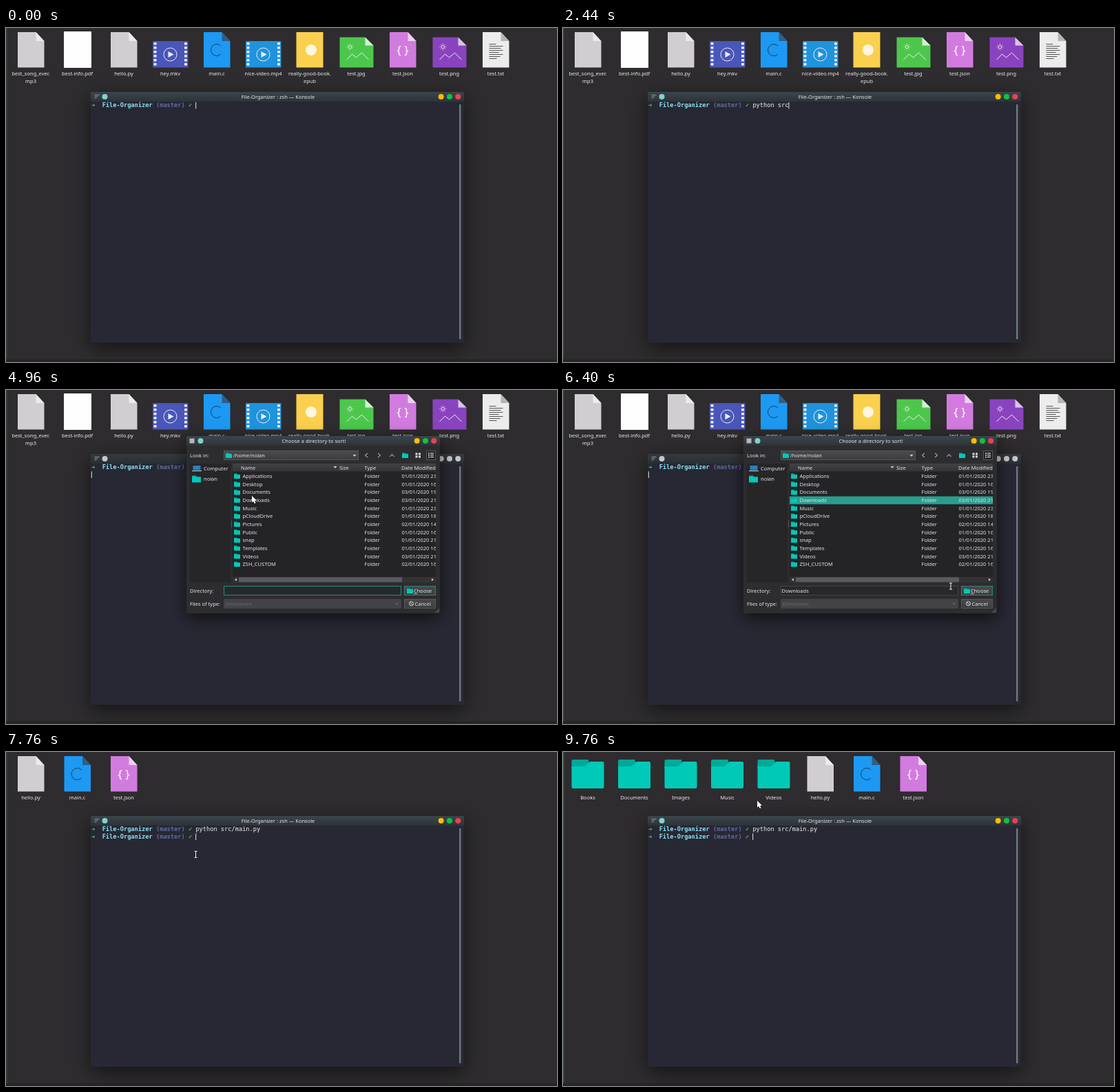
These frames come from a looping animation (800x486 px, 10 s). An HTML page with a canvas:

```html
<!DOCTYPE html>
<html lang="en">
<head>
<meta charset="utf-8">
<title>File organizer</title>
<style>
html, body { margin: 0; width: 100%; height: 100%; overflow: hidden; background: #2e2c2e; }
canvas { display: block; }
</style>
</head>
<body>
<canvas id="stage" width="800" height="486"></canvas>
<script>
const c = document.getElementById('stage').getContext('2d');
const LOOP = 10000, TEAL = '#00c9b7', CELL = 5.22;
const UI = '7.5px "Noto Sans", sans-serif';
const MONO = '8.67px "DejaVu Sans Mono", monospace';

// ---- helpers ----
function rect(x, y, w, h, fill, r = 0) {
  c.fillStyle = fill;
  c.beginPath();
  c.roundRect(x, y, w, h, r);
  c.fill();
}
function frame(x, y, w, h, color) {
  c.strokeStyle = color;
  c.lineWidth = 1;
  c.strokeRect(x + .5, y + .5, w - 1, h - 1);
}
function poly(points, fill) {
  c.fillStyle = fill;
  c.beginPath();
  for (let i = 0; i < points.length; i += 2) c.lineTo(points[i], points[i + 1]);
  c.closePath();
  c.fill();
}
function line(points, color, width = 1) {
  c.strokeStyle = color;
  c.lineWidth = width;
  c.beginPath();
  for (let i = 0; i < points.length; i += 2) c.lineTo(points[i], points[i + 1]);
  c.stroke();
}
function dot(x, y, r, fill) {
  c.fillStyle = fill;
  c.beginPath();
  c.arc(x, y, r, 0, 7);
  c.fill();
}
function ring(x, y, r, color, from = 0, to = 7) {
  c.strokeStyle = color;
  c.lineWidth = 1;
  c.beginPath();
  c.arc(x, y, r, from, to);
  c.stroke();
}
function text(s, x, y, color = '#e6e6e6', align = 'left', font = UI) {
  c.font = font;
  c.textAlign = align;
  c.fillStyle = color;
  c.fillText(s, x, y);
}
function shade(y, h, top, bottom) {
  const g = c.createLinearGradient(0, y, 0, y + h);
  g.addColorStop(0, top);
  g.addColorStop(1, bottom);
  return g;
}
function shadowed(blur, drop, alpha, paint) {
  c.save();
  c.shadowColor = `rgba(0,0,0,${alpha})`;
  c.shadowBlur = blur;
  c.shadowOffsetY = drop;
  paint();
  c.restore();
}
const clamp = v => Math.max(0, Math.min(1, v));
const ease = v => v * v * (3 - 2 * v);

// ---- desktop icons, drawn around x = 0 ----
function doc(fill, fold) {
  poly([-19, 6, 7.5, 6, 19.5, 19, 19.5, 57.5, -19, 57.5], fill);
  poly([7.5, 6, 19.5, 19, 7.5, 19], fold);
}
function film(fill) {
  rect(-25.5, 19, 51.5, 38.5, fill, 1);
  for (let y = 21; y < 56; y += 6)
    for (const x of [-24, 20.5]) rect(x, y, 4, 3.5, '#e8eefa', .5);
  ring(0, 38.5, 9.5, '#eef');
  poly([-3, 34, 5, 38.5, -3, 43], '#eef');
}
function picture(fill, fold) {
  poly([-24, 13.5, 13, 13.5, 25, 25.5, 25, 57.5, -24, 57.5], fill);
  poly([13, 13.5, 25, 25.5, 13, 25.5], fold);
  line([-14, 46, -6, 38, 0, 43, 8, 36, 18, 46], '#f0f0f0');
  ring(-9, 27.5, 2.2, '#f0f0f0');
  for (let a = 0; a < 8; a++) {
    const x = Math.cos(a * Math.PI / 4), y = Math.sin(a * Math.PI / 4);
    line([-9 + 3.3 * x, 27.5 + 3.3 * y, -9 + 4.8 * x, 27.5 + 4.8 * y], '#f0f0f0', .8);
  }
}
function folder() {
  rect(-23.5, 11, 25, 14, '#00a999', 2);
  c.fillStyle = TEAL;
  c.beginPath();
  c.moveTo(-23.5, 21);
  c.lineTo(-4, 21);
  c.lineTo(3, 14);
  c.lineTo(21.5, 14);
  c.quadraticCurveTo(23.5, 14, 23.5, 16);
  c.lineTo(23.5, 51);
  c.quadraticCurveTo(23.5, 53, 21.5, 53);
  c.lineTo(-21.5, 53);
  c.quadraticCurveTo(-23.5, 53, -23.5, 51);
  c.fill();
}
const plain = () => doc('#d0ced0', '#ebebeb');
const icons = {
  mp3: plain,
  py: plain,
  pdf: () => rect(-19.5, 5, 40, 53, '#fefefe'),
  mkv: () => film('#4a56b8'),
  mp4: () => film('#1f93dc'),
  c() {
    doc('#1d99f3', '#2f5f85');
    ring(0, 32, 8.5, '#173f63', .8, 5.5);
  },
  epub() {
    rect(-19.5, 6, 39, 51.5, '#fbd04f');
    dot(2, 32, 8, '#fdf6e0');
  },
  jpg: () => picture('#4cc74c', '#d5efd5'),
  png: () => picture('#8a43bf', '#d9c3e8'),
  json() {
    doc('#d27bdf', '#ecd0f0');
    text('{ }', 0, 38, '#fff', 'center', '300 17px "Noto Sans", sans-serif');
  },
  txt() {
    doc('#ececec', '#b5b5b5');
    [10, 20, 17, 20, 14, 20, 16, 11].forEach((w, i) => rect(-9.5, 23 + i * 3, w, 1, '#555'));
  }
};
const allFiles = ['best_song_ever.|mp3', 'best-info.pdf', 'hello.py', 'hey.mkv', 'main.c', 'nice-video.mp4',
  'really-good-book.|epub', 'test.jpg', 'test.json', 'test.png', 'test.txt'];
const codeFiles = ['hello.py', 'main.c', 'test.json'];
const sorted = ['Books', 'Documents', 'Images', 'Music', 'Videos', ...codeFiles];

function desktop(t) {
  rect(0, 0, 800, 486, '#2e2c2e');
  rect(0, 0, 1.5, 486, t > 9100 ? '#2c5a50' : '#3a4142');
  rect(0, 482, 800, 4, '#272527');
  const items = t < 7760 ? allFiles : t < 7800 ? codeFiles : sorted;
  items.forEach((name, i) => {
    c.save();
    c.translate(36 + 67.5 * i, 0);
    (icons[name.split(/[.|]+/).pop()] || folder)();
    name.split('|').forEach((s, row) => text(s, 0, 69.3 + row * 10.3, '#ececec', 'center'));
    c.restore();
  });
}

// ---- windows ----
function titleBar(x, y, w, title, active) {
  rect(x, y, w, 14, shade(y, 14, active ? '#3b454b' : '#343a40', active ? '#2d343a' : '#2b2f35'), [2, 2, 0, 0]);
  text(title, x + w / 2 + 1, y + 9.7, active ? '#e6e8e8' : '#a5a8aa', 'center');
  const colors = active ? ['#ffbd00', '#13c23f', '#e8434e'] : ['#c6c7c9', '#c6c7c9', '#c6c7c9'];
  colors.forEach((fill, i) => dot(x + w - 33.3 + i * 12.3, y + 7, 4, fill));
  dot(x + 20.5, y + 7, 4, active ? '#7fd3c9' : '#c6c7c9');
}

const command = 'python src/main.py';
const keyTimes = [880, 960, 1120, 1200, 1280, 1360, 1440, 1720, 1880, 2440, 2680,
  2920, 3040, 3160, 3280, 3400, 3520, 3640];

function term(s, col, row, color, weight = 'bold ') {
  text(s, 124 + col * CELL, 115.4 + row * 10.5, color, 'left', weight + MONO);
}
function prompt(row) {
  term('➜', 0, row, '#3fe06a');
  term('File-Organizer', 3, row, '#8be3f7');
  term('(master)', 18, row, '#5f6da3');
  term('✓', 27, row, '#50fa7b');
}
function terminal(t) {
  const active = t < 4480 || t >= 6720;
  shadowed(28, 8, .55, () => rect(123, 93, 542, 365, '#282a36', 2));
  titleBar(123, 93, 542, 'File-Organizer : zsh — Konsole', active);
  for (let i = 0; i < 3; i++) rect(128.5, 97 + i * 2.2, 7 - i * 2, 1, '#8c9398');
  rect(123, 107, 542, 351, '#272833');
  rect(658, 111, 2.5, 342, '#6d777e', 1);

  const typed = keyTimes.filter(k => k <= t).length;
  prompt(0);
  term(command.slice(0, typed), 29, 0, '#f2f2ee', '');
  let col = 29 + typed, row = 0;
  if (t >= 4000) [col, row] = [0, 1];
  if (t >= 7760) {
    prompt(1);
    col = 29;
  }
  rect(124 + col * CELL - .2, 108 + row * 10.5, 1, 9.5, '#e8e8e8');
}

// ---- directory chooser ----
const folders = [['Applications', '01', 23], ['Desktop', '01', 16], ['Documents', '03', 19], ['Downloads', '03', 21],
  ['Music', '01', 23], ['pCloudDrive', '01', 18], ['Pictures', '02', 14], ['Public', '01', 16], ['snap', '01', 21],
  ['Templates', '01', 16], ['Videos', '03', 21], ['ZSH_CUSTOM', '02', 16]];

function smallFolder(x, y, w = 9, h = 7.5) {
  rect(x, y, w * .5, h * .5, '#00a999', .5);
  rect(x, y + h * .17, w, h * .83, TEAL, .5);
}
function button(x, y, w, h, border = '#55575a') {
  rect(x, y, w, h, shade(y, h, '#4a4b4e', '#3b3c3f'), 1.5);
  frame(x, y, w, h, border);
}
function chooser(t) {
  const picked = t >= 5640;
  shadowed(24, 7, .6, () => rect(262, 67, 368, 258, '#2d2c2f', 2));
  titleBar(262, 67, 368, 'Choose a directory to sort!', true);
  rect(266.5, 70.5, 7, 7, '#b4b7b9');

  text('Look in:', 267, 98);
  button(316, 88, 196, 14);
  smallFolder(319, 91.5);
  text('/home/nolan', 330, 98);
  poly([503.5, 94, 508.5, 94, 506, 97], '#ccc');
  line([525, 92, 521.5, 95, 525, 98], '#ddd');
  line([540, 92, 543.5, 95, 540, 98], '#ddd');
  line([557.5, 97, 560.5, 93.5, 563.5, 97], '#ddd');
  smallFolder(575, 91.5);
  for (let i = 0; i < 4; i++) {
    const x = 594.5 + i % 2 * 4.5, y = 91.5 + (i >> 1) * 4;
    rect(x, y, 3, 3, '#ddd');
  }
  rect(610, 88, 14, 14, '#232326', 1);
  frame(610, 88, 14, 14, '#58595c');
  for (let i = 0; i < 3; i++) {
    rect(613, 91.5 + i * 2.7, 2, 1.5, '#ddd');
    rect(616, 91.5 + i * 2.7, 5, 1.2, '#ddd');
  }

  rect(267, 107, 59, 173, '#262629');
  rect(271.5, 110, 11, 6.5, '#2a7fc0', .5);
  rect(270, 117, 14, 1.3, '#a9b2b8');
  text('Computer', 287, 117);
  smallFolder(270, 124.5, 13, 10);
  text('nolan', 287, 132);
  rect(327, 190, 1, 10, '#555');

  rect(329, 107, 295, 173, '#242427');
  rect(329, 107, 295, 11.5, shade(107, 11.5, '#424246', '#343438'));
  text('Name', 341, 116);
  poly([475.5, 111, 480.5, 111, 478, 114], '#ccc');
  text('Size', 484, 116);
  text('Type', 520.5, 116);
  c.save();
  c.beginPath();
  c.rect(329, 107, 295, 173);
  c.clip();
  text('Date Modified', 574, 116);
  folders.forEach(([name, day, hour], i) => {
    const y = 125.6 + i * 11.64;
    if (picked && name === 'Downloads') rect(329, y - 5.8, 295, 11.6, '#2a9d8f');
    smallFolder(331, y - 4);
    text(name, 343.5, y + 2.6);
    text('Folder', 520.5, y + 2.6);
    text(`${day}/01/2020 ${hour}:`, 574.5, y + 2.6);
  });
  c.restore();
  rect(329, 272, 295, 8, '#333336');
  rect(338, 272.5, 237, 7, '#5a5b5e', 1);
  poly([332, 276, 335, 274, 335, 278], '#ccc');
  poly([621, 276, 618, 274, 618, 278], '#ccc');

  text('Directory:', 267, 295);
  rect(316, 285, 258, 14, '#28282b', 1);
  frame(316, 285, 258, 14, picked ? '#424346' : '#238c80');
  if (picked) text('Downloads', 317.5, 295);
  button(578, 285, 46, 14, '#2f8278');
  smallFolder(582, 288.5);
  text('Choose', 592, 295);
  rect(592, 296.3, 5, .7, '#e6e6e6');

  text('Files of type:', 267, 313.5);
  rect(316, 304, 258, 14, '#434347', 1.5);
  text('Directories', 318.5, 313.5, '#6c6c70');
  poly([565, 310, 570, 310, 567.5, 313], '#646468');
  button(578, 304, 46, 14);
  ring(588.5, 310.8, 3, '#ddd');
  line([586.5, 308.8, 590.5, 312.8], '#ddd');
  text('Cancel', 593.5, 313.5);
  for (let i = 0; i < 3; i++) line([629, 318 + i * 2, 623 + i * 2, 324], '#77787a', .7);
}
function dialog(t) {
  const shown = t < 6000 ? ease(clamp((t - 4440) / 240)) : 1 - ease(clamp((t - 6680) / 200));
  if (shown <= 0) return;
  const k = .85 + .15 * shown;
  c.save();
  c.globalAlpha = shown;
  c.translate(446, 196);
  c.scale(k, k);
  c.translate(-446, -196);
  chooser(t);
  c.restore();
}

// ---- mouse: time, x, y ----
const path = [[4720, 388, 196], [4960, 357, 154], [5440, 357, 154], [5600, 358, 160], [5760, 358, 160],
  [6400, 563, 285.5], [6520, 597, 292], [6680, 597, 292], [7480, 275.5, 149], [8560, 275.5, 149],
  [8600, 281, 79], [9100, 2, 50], [9600, 282, 71], [LOOP, 282, 71]];

function mouse(t) {
  const i = path.findIndex(p => p[0] > t);
  if (i < 1) return;
  const [t0, x0, y0] = path[i - 1], [t1, x1, y1] = path[i];
  const k = ease((t - t0) / (t1 - t0));
  const x = x0 + (x1 - x0) * k, y = y0 + (y1 - y0) * k;
  const overText = t < 6780 ? x > 316 && x < 574 && y > 284 && y < 300 : x > 123 && x < 665 && y > 107;
  if (overText) {
    rect(x - .5, y - 4.5, 1, 9, '#f4f4f4');
    rect(x - 2, y - 5, 4, 1, '#f4f4f4');
    rect(x - 2, y + 4, 4, 1, '#f4f4f4');
  } else {
    shadowed(2, 1, .6, () => poly([x, y, x, y + 9.5, x + 2.2, y + 8, x + 3.8, y + 11.2, x + 5.4, y + 10.4,
      x + 4.2, y + 7.2, x + 6.8, y + 6.8], '#fff'));
  }
}

function draw(now) {
  const t = now % LOOP;
  desktop(t);
  terminal(t);
  dialog(t);
  mouse(t);
}
const start = performance.now();
function tick() {
  draw(performance.now() - start);
  requestAnimationFrame(tick);
}
tick();
</script>
</body>
</html>
```
